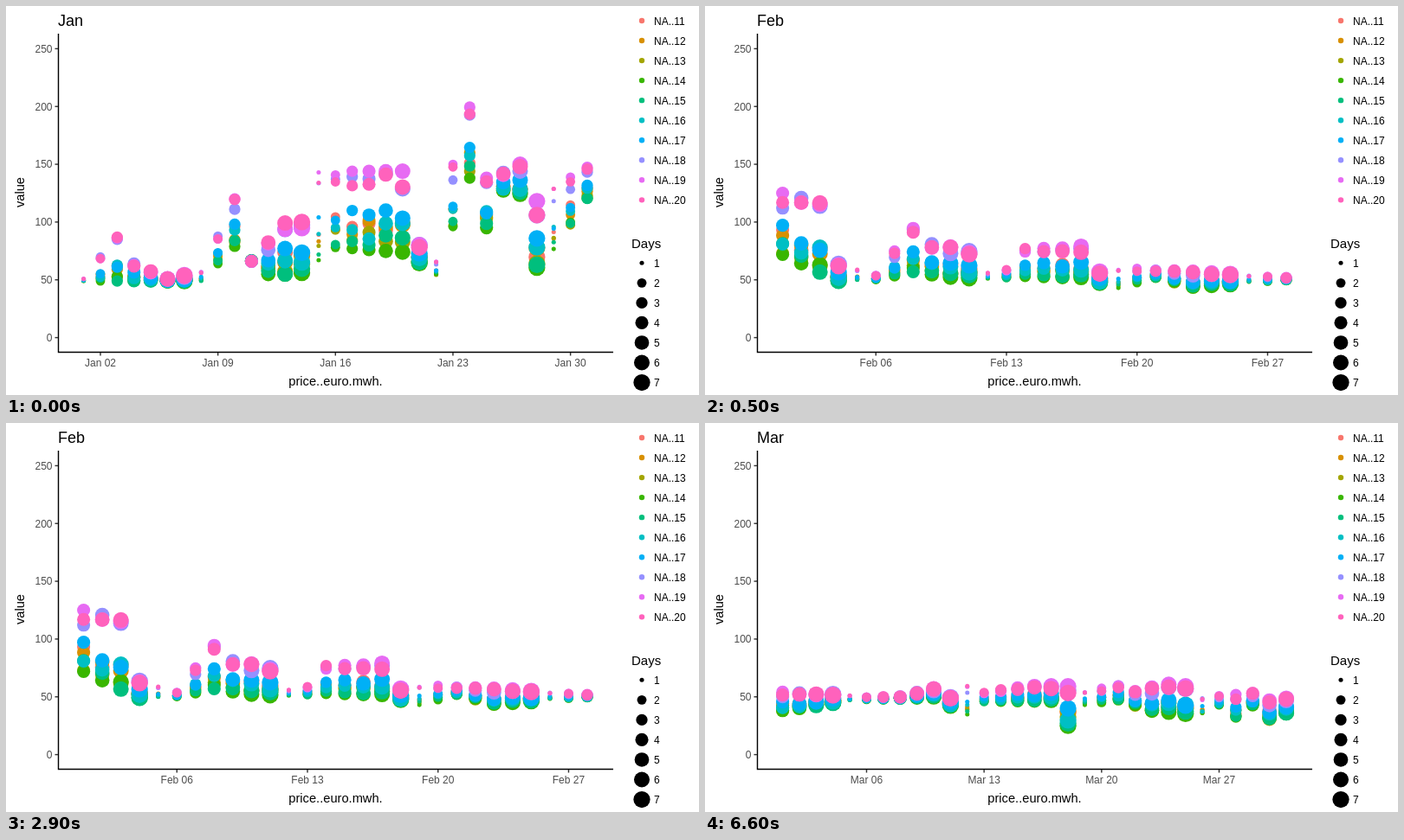
These frames come from a looping animation (800 px wide and 450 px high, 8 s). An HTML page:

```html
<!DOCTYPE html>
<html lang="en">
<head>
<meta charset="utf-8">
<title>Monthly prices</title>
<style>
  html, body { margin: 0; width: 100%; height: 100%; overflow: hidden; background: #fff; }
  svg { display: block; width: 800px; height: 450px; font: 12px "Liberation Sans", Arial, sans-serif; }
  .axis { fill: none; stroke: #000; stroke-width: 1.42; }
  .tick { stroke: #333; stroke-width: 1.42; }
  .label { fill: #4d4d4d; }
  .title { font-size: 14.67px; }
</style>
</head>
<body>
<svg viewBox="0 0 800 450">
  <path class="axis" d="M60.5 32V400.5H701"/>
  <text class="title" x="380.5" y="439" text-anchor="middle">price..euro.mwh.</text>
  <text class="title" transform="translate(21 215.5) rotate(-90)" text-anchor="middle">value</text>
  <text x="722" y="280" font-size="15">Days</text>
  <g id="fixed"></g>
  <g id="month"></g>
</svg>
<script>
const LOOP = 8000;
const COLORS = ['#f8766d', '#d89000', '#a3a500', '#39b600', '#00bf7d',
  '#00bfc4', '#00b0f6', '#9590ff', '#e76bf3', '#ff62bc'];

// Where each series usually lies between the day's lowest and highest price
const PROFILE = [0.3, 0.25, 0.12, 0, 0.1, 0.25, 0.4, 0.85, 0.95, 0.9];

// low and high are key points, day: price; weekday 0 is Sunday
const MONTHS = [
  {
    name: 'Jan', start: 0, length: 31, weekday: 0,
    low: { 1: 49, 8: 49, 10: 79, 12: 54, 14: 56, 16: 78, 20: 74, 22: 54,
      24: 138, 25: 95, 26: 125, 27: 124, 28: 56, 31: 118 },
    high: { 1: 51, 3: 91, 4: 65, 6: 51, 8: 57, 10: 121, 11: 66, 13: 100, 14: 100,
      15: 144, 20: 144, 21: 82, 22: 66, 23: 150, 24: 200, 25: 138, 27: 150, 28: 118, 31: 150 }
  },
  {
    name: 'Feb', start: 500, length: 28, weekday: 3,
    low: { 1: 72, 4: 49, 6: 50, 8: 57, 11: 50, 14: 53, 17: 52, 19: 43, 21: 52, 23: 44, 28: 50 },
    high: { 1: 125, 3: 123, 4: 65, 6: 54, 8: 96, 9: 82, 11: 76, 12: 56, 13: 59,
      14: 77, 17: 79, 18: 57, 20: 60, 28: 52 }
  },
  {
    name: 'Mar', start: 4500, length: 31, weekday: 3,
    low: { 1: 38, 5: 47, 10: 50, 12: 34, 13: 46, 17: 47, 18: 25, 19: 43, 21: 47,
      23: 38, 26: 34, 27: 43, 28: 31, 29: 43, 30: 31, 31: 35 },
    high: { 1: 54, 4: 53, 6: 50, 8: 50, 10: 57, 11: 50, 12: 60, 13: 54, 16: 60,
      18: 59, 19: 54, 21: 61, 22: 55, 24: 61, 25: 59, 26: 50, 29: 53, 30: 47, 31: 50 }
  }
];

const yOf = value => 383.6 - value * 1.3368;
const radius = size => 1.1 + 1.4225 * (1 + 5 * Math.sqrt((size - 1) / 6));
const dot = (x, y, r, color) => `<circle cx="${x}" cy="${y}" r="${r}" fill="${color}"/>`;
const text = (x, y, content, attrs = '') => `<text x="${x}" y="${y}" ${attrs}>${content}</text>`;

// Straight lines between key points
function curve(keys, day) {
  const days = Object.keys(keys).map(Number);
  const to = days.find(d => d >= day);
  if (to === day) return keys[day];
  const from = days.findLast(d => d < day);
  return keys[from] + (keys[to] - keys[from]) * (day - from) / (to - from);
}

// Repeatable noise from -1 to 1
function noise(day, series) {
  const n = Math.sin(day * 12.9898 + series * 78.233) * 43758.5453;
  return 2 * (n - Math.floor(n)) - 1;
}

function price({ low, high }, day, series) {
  const share = PROFILE[series] + 0.12 * noise(day, series);
  const bottom = curve(low, day);
  return bottom + (curve(high, day) - bottom) * Math.min(1, Math.max(0, share));
}

function drawFixed() {
  let out = '';
  for (let v = 0; v <= 250; v += 50) {
    out += `<path class="tick" d="M56.5 ${yOf(v)}H60"/>`
      + text(53.5, yOf(v) + 4.3, v, 'class="label" text-anchor="end"');
  }
  COLORS.forEach((color, i) => {
    const y = 17 + 23.04 * i;
    out += dot(734, y, 3.2, color) + text(748, y + 4.6, `NA..${i + 11}`);
  });
  for (let size = 1; size <= 7; size++) {
    const y = 297.3 + 23.04 * (size - 1);
    out += dot(734, y, radius(size), '#000') + text(748, y + 4.6, size);
  }
  return out;
}

function drawMonth(month) {
  let out = text(60, 23, month.name, 'font-size="18"');
  for (let day = 1; day <= month.length; day++) {
    const x = 89.6 + 581.4 * (day - 1) / (month.length - 1);
    const size = (month.weekday + day - 1) % 7 + 1;
    if (size === 2) {
      const label = `${month.name} ${String(day).padStart(2, '0')}`;
      out += `<path class="tick" d="M${x} 401V404.5"/>`
        + text(x, 417, label, 'class="label" text-anchor="middle"');
    }
    COLORS.forEach((color, series) => {
      out += dot(x, yOf(price(month, day, series)), radius(size), color);
    });
  }
  return out;
}

const monthGroup = document.getElementById('month');
let shown;
function frame() {
  const t = performance.now() % LOOP;
  const current = MONTHS.findLast(month => t >= month.start);
  if (current !== shown) {
    shown = current;
    monthGroup.innerHTML = drawMonth(current);
  }
  requestAnimationFrame(frame);
}

document.getElementById('fixed').innerHTML = drawFixed();
frame();
</script>
</body>
</html>
```
